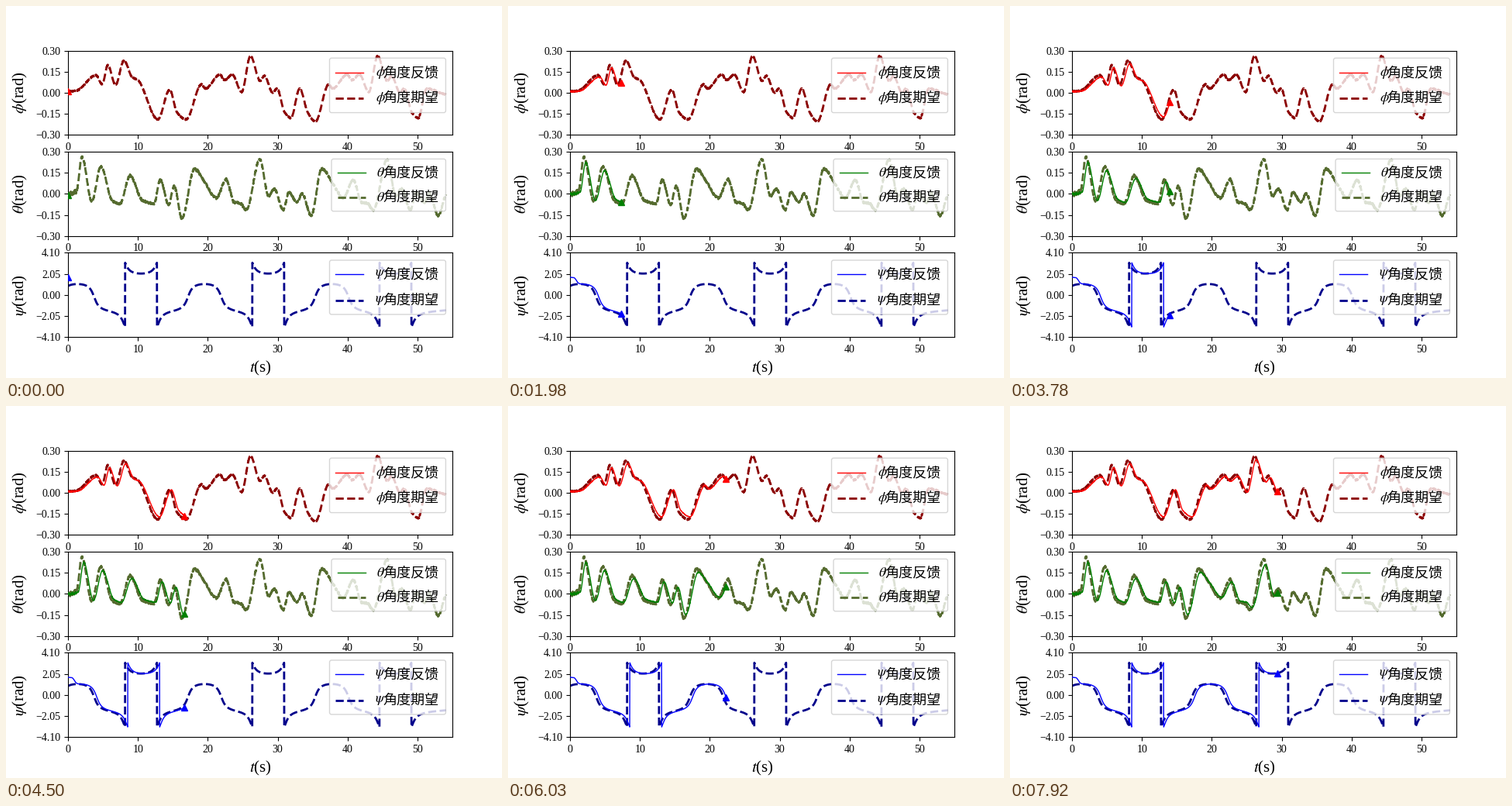
A matplotlib script for the animation above (8000 ms loop, 640 by 480 pixels).

```python
import matplotlib.pyplot as plt
import numpy as np
from matplotlib.animation import FuncAnimation
from matplotlib.lines import Line2D
from matplotlib.patches import FancyBboxPatch
from matplotlib.transforms import Affine2D

plt.rcParams.update({
    "font.family": "Liberation Serif",
    "mathtext.fontset": "stix",
})

W, H, DPI = 640, 480, 100
FRAMES, LOOP_MS = 89, 8000
STEP = 0.3335        # seconds of flight per frame
LAP = 18.2           # seconds per figure-eight lap
END = 54.1

# Turning points of the tilt commands: (time in s, angle in rad)
PHI = [
    (0, .01), (1.2, .015), (4, .125), (4.9, .06), (5.7, .197), (6.8, .055),
    (8, .23), (9.2, .11), (10, .09), (12.85, -.19), (14.55, .022),
    (15.6, -.14), (16.9, -.19), (19.1, .06), (19.65, .03), (21.75, .13),
    (22.4, .09), (23.5, .13), (24.85, .005), (26.1, .262), (27.5, .085),
    (28.1, .12), (29.3, 0), (29.9, .03), (31, -.14), (31.9, -.18),
    (33.15, .03), (34.3, -.14), (35.4, -.205),
]
THETA = [
    (0, 0), (1.2, .015), (2, .265), (3.4, -.055), (4.7, .195), (6.3, -.045),
    (7.4, -.072), (8.9, .13), (10.6, -.045), (12.3, -.07), (13.2, .1),
    (14.4, -.075), (15.2, .055), (16.3, -.175), (18.1, .18), (19.5, .09),
    (21.2, -.03), (22.6, .1), (23.8, -.06), (24.7, -.07), (25.5, -.115),
    (27.45, .245), (28.7, -.015), (29.5, .035), (30.8, -.115), (31.6, .01),
    (32.8, -.06), (33.5, 0), (34.8, -.155),
]


def with_last_lap(points, until):
    """Fly the second lap once more, then level off."""
    again = [(t + LAP, v) for t, v in points if 17.5 < t < until - LAP]
    return points + again + [(END, -.01)]


def curve(points, t):
    """Monotone cubic through the turning points."""
    x, y = np.array(points, float).T
    h = np.diff(x)
    d = np.diff(y) / h
    m = np.zeros_like(y)
    prod = d[:-1] * d[1:]
    total = np.where(prod > 0, d[:-1] + d[1:], 1)
    m[1:-1] = np.where(prod > 0, 2 * prod / total, 0)
    k = np.clip(np.searchsorted(x, t, side="right") - 1, 0, len(h) - 1)
    s = np.clip((t - x[k]) / h[k], 0, 1)
    return ((1 + 2 * s) * (1 - s) ** 2 * y[k] + s * (1 - s) ** 2 * h[k] * m[k]
            + s * s * (3 - 2 * s) * y[k + 1] + s * s * (s - 1) * h[k] * m[k + 1])


def heading(t):
    """Direction of travel along a figure eight, slowing down at the end."""
    rest = np.maximum(t - 49, 0)
    t = np.minimum(t, 49) + 3.8 * (1 - np.exp(-rest / 3.8))
    a = 2 * np.pi * (t - 15) / LAP
    return np.arctan2(.56 * np.sin(a), np.cos(2 * a)) - np.pi / 2


def wrap(angle):
    return (angle + np.pi) % (2 * np.pi) - np.pi


rng = np.random.default_rng(4)


def noise(t, level, start_level):
    return rng.normal(0, 1, len(t)) * np.where(t < 1.2, start_level, level)


t = np.arange(0, END, 0.02)
phi = with_last_lap(PHI, 51.5)
theta = with_last_lap(THETA, 53.2)
commands = [
    curve(phi, t) + noise(t, .0018, .0018),
    curve(theta, t) + noise(t, .004, .008),
    wrap(heading(t)),
]
# The vehicle follows late and a little weaker; yaw first turns into place.
feedback = [
    .9 * curve(phi, t - .25) + noise(t, .001, .003),
    .85 * curve(theta, t - .25) + noise(t, .0015, .006),
    wrap(heading(np.maximum(t - .38, 0)) + .85 / (1 + np.exp(6 * (t - .9)))),
]

fig, axes = plt.subplots(3, 1, figsize=(W / DPI, H / DPI), dpi=DPI)
PIXELS = Affine2D().scale(1, -1).translate(0, H)


def put_text(x, y, text, size, **kw):
    kw = {"ha": "center", "va": "center", **kw}
    fig.text(x, y, text, fontsize=size, transform=PIXELS, zorder=6, **kw)


def put_legend(left, top, bottom, rows, symbol, colors):
    fig.add_artist(FancyBboxPatch(
        (left, top), 567.4 - left, bottom - top,
        boxstyle="round,pad=0,rounding_size=0.2", mutation_scale=13,
        fc="white", ec="0.8", lw=1, alpha=0.8, transform=PIXELS, zorder=4))
    styles = [("-", 1, "角度反馈"), ("--", 2, "角度期望")]
    for y, color, (style, width, label) in zip(rows, colors, styles):
        fig.add_artist(Line2D([left + 7.5, left + 43.8], [y, y], color=color,
                              ls=style, lw=width, transform=PIXELS, zorder=5))
        put_text(483, y, f"${symbol}$", 13)
        put_text(486.8, y, label, 13, ha="left", family="Noto Sans CJK JP")


panels = [
    (r"\phi", .3, ("red", "darkred"), (417.5, 67.2, 137.6, (86, 119))),
    (r"\theta", .3, ("green", "darkolivegreen"), (420, 197.4, 264.8, (215, 247))),
    (r"\psi", 4.1, ("blue", "darkblue"), (417.5, 328, 398, (346, 379.5))),
]
lines, markers = [], []
for ax, command, (symbol, top, colors, box) in zip(axes, commands, panels):
    ax.set(xlim=(0, 55), ylim=(-top, top), yticks=np.linspace(-top, top, 5))
    ax.yaxis.set_major_formatter("{x:.2f}")
    ax.plot(t, command, "--", color=colors[1], lw=2)
    lines += ax.plot([], [], color=colors[0], lw=1, zorder=3)
    markers += ax.plot([], [], "^", color=colors[0], zorder=3)
    place = ax.get_position()
    put_text(18.5, H * (1 - (place.y0 + place.y1) / 2), f"${symbol}$(rad)", 15,
             rotation=90)
    put_legend(*box, symbol, colors)
put_text(328, 467.5, "$t$(s)", 15)


def draw(i):
    n = int(round(i * STEP / 0.02)) + 1
    for line, marker, data in zip(lines, markers, feedback):
        line.set_data(t[:n], data[:n])
        marker.set_data([t[n - 1]], [data[n - 1]])
    return lines + markers


anim = FuncAnimation(fig, draw, frames=FRAMES, interval=LOOP_MS / FRAMES,
                     repeat=True, repeat_delay=0, blit=False)
plt.show()
```
